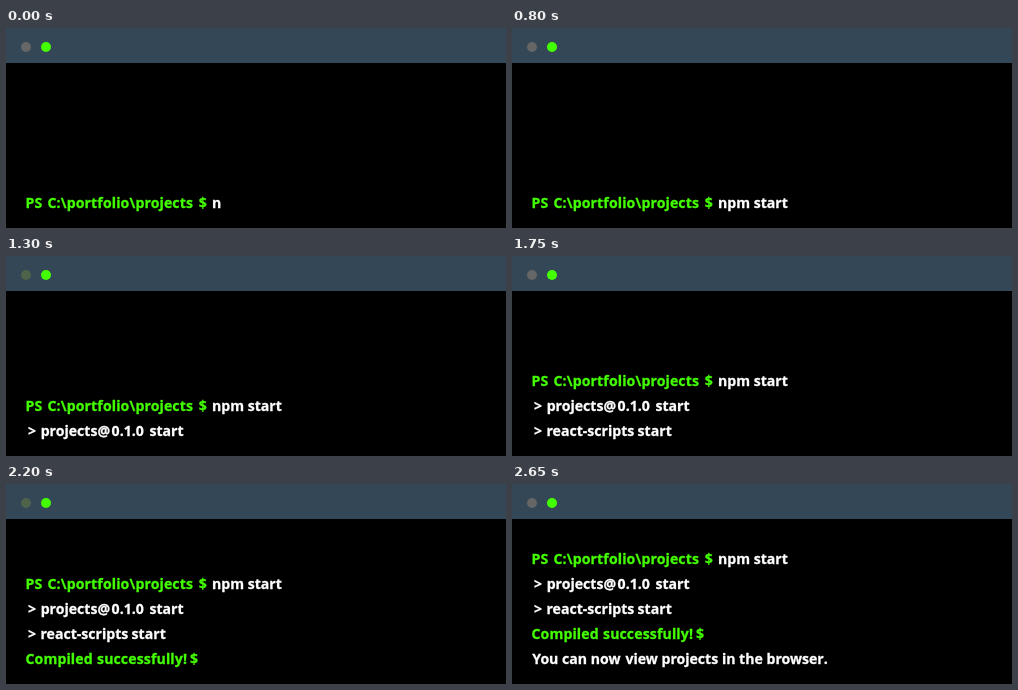
An HTML page that plays this animation: 500x200 px, repeating every 4.1 s.

```html
<!DOCTYPE html>
<html lang="en">
<head>
<meta charset="utf-8">
<title>Terminal</title>
<style>
  html, body { margin: 0; width: 100%; height: 100%; overflow: hidden; background: #000; }
  svg { display: block; width: 500px; height: 200px; }
  text { font: 700 14.1px "Open Sans", "Noto Sans", sans-serif; fill: #fff; stroke: #fff; stroke-width: .3px; white-space: pre; }
  text.green { fill: #4f0; stroke: #4f0; letter-spacing: .12px; }
</style>
</head>
<body>
<svg viewBox="0 0 500 200">
  <rect width="500" height="200" fill="#000"/>
  <rect width="500" height="35" fill="#344756"/>
  <circle id="dot" cx="20" cy="19" r="5" fill="#666"/>
  <circle cx="40" cy="19" r="5" fill="#4f0"/>
  <g id="screen"></g>
</svg>
<script>
const LOOP = 4100, LINE = 25, BASE = 180;
const COMMAND = "npm start";

// Each line: time it appears, colour class, words as [x, text]
const LINES = [
  { at: 0, cls: "green", words: [[19.5, "PS"], [41.5, "C:\\portfolio\\projects"], [192.8, "$"]] },
  { at: 1300, cls: "", words: [[22, ">"], [34.7, "projects@"], [105.6, "0.1.0"], [143.4, "start"]] },
  { at: 1750, cls: "", words: [[22, ">"], [34.5, "react-scripts"], [125.6, "start"]] },
  { at: 2200, cls: "green", words: [[19.5, "Compiled"], [91, "successfully!"], [184, "$"]] },
  { at: 2650, cls: "", words: [[20.3, "You can now"], [113.4, "view projects in the browser."]] }
];
const SCROLLS = [1100, 1550, 2000, 2450];
const DIM = [[1100, 1550], [2000, 2450]];

const screen = document.getElementById("screen");
const dot = document.getElementById("dot");

function make(tag, parent, attrs = {}) {
  const el = document.createElementNS("http://www.w3.org/2000/svg", tag);
  for (const key in attrs) el.setAttribute(key, attrs[key]);
  return parent.appendChild(el);
}

const groups = LINES.map((line, i) => {
  const group = make("g", screen);
  for (const [x, text] of line.words)
    make("text", group, { x, y: BASE + i * LINE, class: line.cls }).textContent = text;
  return group;
});
const typed = make("text", groups[0], { x: 206, y: BASE });

function draw(t) {
  typed.textContent = COMMAND.slice(0, Math.floor(t / 100) + 1);
  const rows = SCROLLS.filter(at => t >= at).length;
  screen.setAttribute("transform", `translate(0 ${-rows * LINE})`);
  groups.forEach((group, i) => {
    group.style.display = t >= LINES[i].at ? "" : "none";
  });
  const dim = DIM.some(([from, to]) => t >= from && t < to);
  dot.setAttribute("fill", dim ? "#4f634b" : "#666");
}

const start = performance.now();
function tick() {
  draw((performance.now() - start) % LOOP);
  requestAnimationFrame(tick);
}
tick();
</script>
</body>
</html>
```
